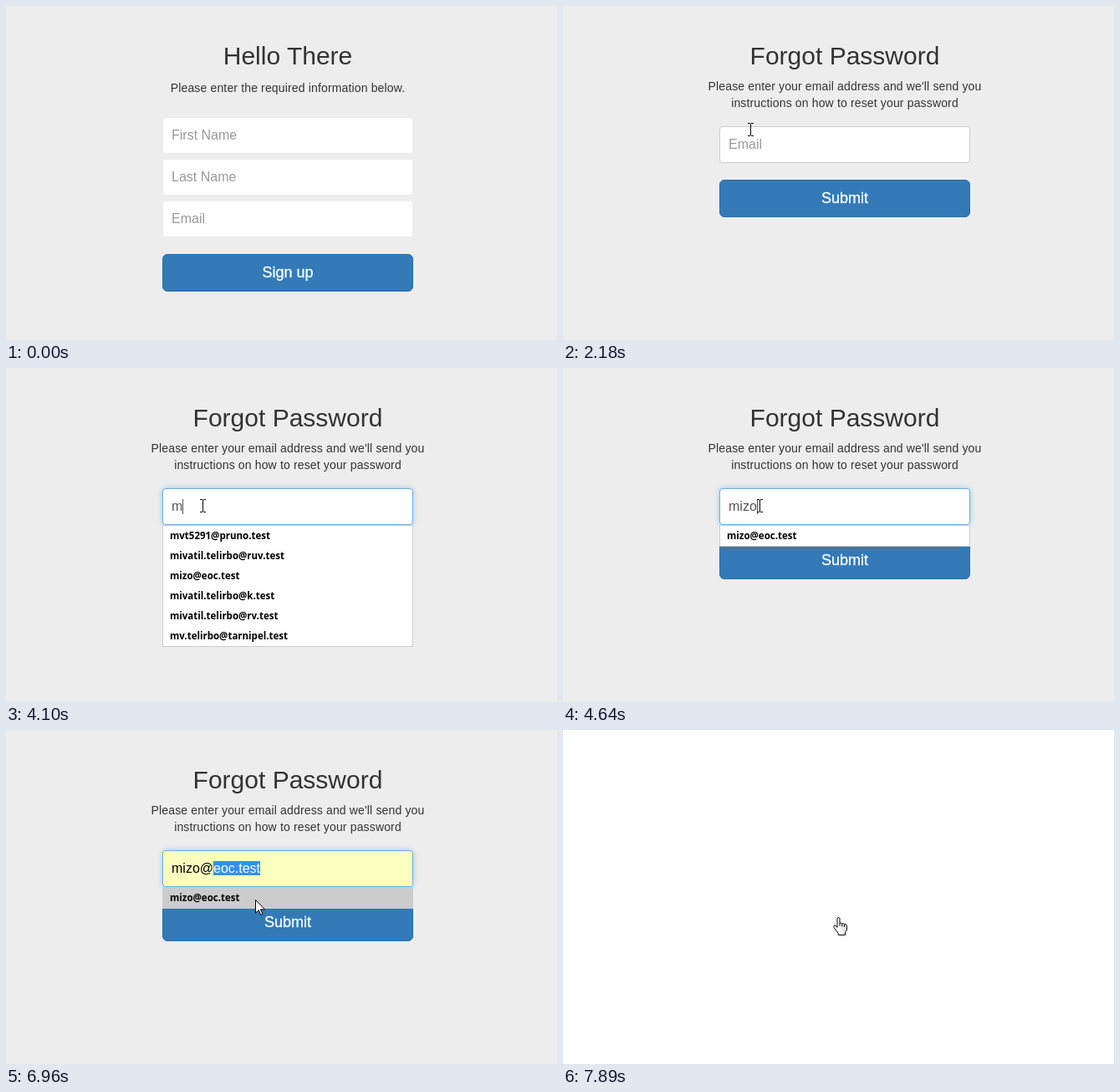
Recreate the animation shown at these times as an HTML page. Size 659 by 400 pixels, loop 8000 ms.

```html
<!DOCTYPE html>
<html lang="en">
<head>
<meta charset="utf-8">
<title>Sign-up forms</title>
<style>
  html, body { margin: 0; width: 100%; height: 100%; overflow: hidden; background: #ededed; }
  svg { display: block; }
  text { font: 14px Arial, "Liberation Sans", sans-serif; fill: #333; white-space: pre; }
  .mid { text-anchor: middle; }
  .body { letter-spacing: .15px; }
  .title { font-size: 30px; }
  .button { font-size: 18px; fill: #fff; stroke: #fff; stroke-width: .3px; }
  .link { fill: #337ab7; }
  .field { font-size: 16px; fill: #555; }
  .hint { fill: #999; }
  .filled { fill: #000; }
  .item { font: bold 11.5px "Open Sans", "Noto Sans", sans-serif; fill: #000; }
  .glow { filter: drop-shadow(0 0 3px rgba(102, 175, 233, .6)); }
</style>
</head>
<body>
<svg id="stage" width="659" height="400" viewBox="0 0 659 400"></svg>
<script>
const LOOP = 8000;
const LEFT = 187, WIDTH = 300, CENTER = 337;
const USER = 'mizo@', HOST = 'eoc.test';
const CARET = [0, 13, 17, 25, 34, 50]; // caret offset after each typed letter
const CONTACTS = [
  'mvt5291@pruno.test', 'mivatil.telirbo@ruv.test', USER + HOST,
  'mivatil.telirbo@k.test', 'mivatil.telirbo@rv.test', 'mv.telirbo@tarnipel.test'
];

// Each entry changes only the listed properties from its time onward.
const TIMELINE = [
  [0, { page: 'register', border: '#ededed', cursor: null, typed: 0, list: null,
        focus: false, caret: false, preview: false, filled: false, button: '#337ab7' }],
  [130, { border: '#ccc' }],
  [1050, { page: 'login', cursor: ['arrow', 157, 184] }],
  [1180, { cursor: ['arrow', 236, 214] }],
  [1330, { cursor: ['arrow', 285, 271] }],
  [1490, { cursor: ['hand', 266, 300] }],
  [1640, { cursor: ['hand', 249, 309] }],
  [2060, { page: 'forgot', cursor: ['arrow', 148, 220] }],
  [2180, { cursor: ['beam', 221, 140] }],
  [2310, { cursor: ['beam', 225, 147] }],
  [2460, { cursor: ['beam', 232, 157] }],
  [2740, { focus: true, caret: true }],
  [3250, { caret: false }],
  [3660, { caret: true }],
  [4100, { typed: 1, list: CONTACTS }],
  [4390, { typed: 2, list: CONTACTS.slice(1, 5) }],
  [4510, { typed: 3, list: [CONTACTS[2]] }],
  [4640, { typed: 4 }],
  [5100, { typed: 5 }],
  [5530, { caret: false }],
  [5680, { preview: true }],
  [6230, { cursor: ['arrow', 161, 197] }],
  [6380, { cursor: ['arrow', 158, 218] }],
  [6530, { cursor: ['arrow', 200, 201], preview: false }],
  [6680, { cursor: ['arrow', 245, 202], preview: true }],
  [6810, { cursor: ['arrow', 284, 202] }],
  [6960, { cursor: ['arrow', 298, 203] }],
  [7090, { cursor: ['hand', 302, 208], preview: false, list: null, filled: true }],
  [7230, { cursor: ['hand', 313, 231], button: '#286090' }],
  [7360, { cursor: ['arrow', 322, 257], button: '#337ab7' }],
  [7480, { cursor: ['hand', 323, 224], button: '#286090' }],
  [7620, { focus: false, button: '#204d74' }],
  [7750, { button: '#286090' }],
  [7890, { page: 'blank' }]
];

const CURSORS = {
  arrow: `<path d="M.5 .5V16.2L4.2 12.7 6.8 18.5 9 17.5 6.4 11.9H11.5Z" fill="#fff" stroke="#000"/>`,
  beam: `<path d="M0 .5H3M4 .5H7M3.5 1V15M0 15.5H3M4 15.5H7" fill="none" stroke="#000"/>`,
  hand: `<linearGradient id="skin"><stop offset=".4" stop-color="#fff"/><stop offset="1" stop-color="#ddd"/></linearGradient>
    <path d="M5 12.5V2.2Q5 .5 6.5 .5T8 2.2V7.5Q9.5 6.3 10.8 8Q12.3 7 13.6 8.7Q16.5 8 16.5 11.5V15L14.5 18.5V21.5H6.2V19.5L1 12.5Q.2 10.3 2 9.8Q3.5 9.8 5 12.5Z
    M8 7.5V11M10.8 8V11.5M13.6 8.7V12" fill="url(#skin)" stroke="#000"/>`
};

const text = (x, y, cls, content) => `<text x="${x}" y="${y}" class="${cls}">${content}</text>`;
const centered = (y, cls, content) => text(CENTER, y, 'mid ' + cls, content);
const link = label => `<tspan class="link">${label}</tspan>`;
const rect = (x, y, w, h, fill, extra = '') =>
  `<rect x="${x}" y="${y}" width="${w}" height="${h}" fill="${fill}" ${extra}/>`;
const box = (y, h, fill, stroke, radius, extra = '') =>
  rect(LEFT + .5, y + .5, WIDTH - 1, h - 1, fill, `stroke="${stroke}" rx="${radius}" ${extra}`);

const input = (y, hint, border) => box(y, 44, '#fff', border, 3.5) + text(198, y + 27, 'field hint', hint);
const button = (y, label, fill = '#337ab7') =>
  box(y, 45, fill, fill === '#337ab7' ? '#2e6da4' : '#204d74', 5.5) + centered(y + 28, 'button', label);

function emailField(s) {
  const yellow = s.preview || s.filled;
  let out = box(144, 44, yellow ? '#faffbd' : '#fff', s.focus ? '#66afe9' : '#ccc', 3.5,
    s.focus ? 'class="glow"' : '');
  if (s.preview) out += rect(248, 157, 56, 17, '#3390ee');
  if (yellow) {
    const host = s.preview ? `<tspan fill="#fff">${HOST}</tspan>` : HOST;
    out += text(198, 171, 'field filled', USER + host);
  } else {
    out += s.typed ? text(198, 171, 'field', USER.slice(0, s.typed)) : text(198, 171, 'field hint', 'Email');
  }
  if (s.caret) out += rect(198 + CARET[s.typed], 157, 1, 18, '#555');
  return out;
}

const suggestions = s => box(188, s.list.length * 24 + 2, s.preview ? '#ccc' : '#fff', '#ccc', 0) +
  s.list.map((address, i) => text(196, 205 + i * 24, 'item', address)).join('');

const PAGES = {
  register: s => centered(70, 'title', 'Hello There') +
    centered(103, 'body', 'Please enter the required information below.') +
    ['First Name', 'Last Name', 'Email'].map((hint, i) => input(133 + i * 50, hint, s.border)).join('') +
    button(297, 'Sign up'),
  login: s => centered(70, 'title', 'Please login') +
    input(101, 'Email', s.border) + input(151, 'Password', s.border) +
    button(215, 'Let me in!') +
    centered(290, 'body', `Don't have an account? Click to ${link('Register')}`) +
    centered(313, 'body', `Click ${link('here')} if you forgot your password.`),
  forgot: s => centered(70, 'title', 'Forgot Password') +
    centered(101, 'body', "Please enter your email address and we'll send you") +
    centered(121, 'body', 'instructions on how to reset your password') +
    button(208, 'Submit', s.button) + emailField(s) + (s.list ? suggestions(s) : ''),
  blank: () => rect(0, 0, 659, 400, '#fefefe')
};

function render(s) {
  let out = PAGES[s.page](s);
  if (s.cursor) {
    const [shape, x, y] = s.cursor;
    out += `<g transform="translate(${x} ${y})">${CURSORS[shape]}</g>`;
  }
  return out;
}

const stage = document.getElementById('stage');
let shown = -1;

function tick() {
  const time = performance.now() % LOOP;
  const passed = TIMELINE.filter(([start]) => start <= time);
  if (passed.length !== shown) {
    shown = passed.length;
    stage.innerHTML = render(Object.assign({}, ...passed.map(([, change]) => change)));
  }
  requestAnimationFrame(tick);
}
tick();
</script>
</body>
</html>
```
